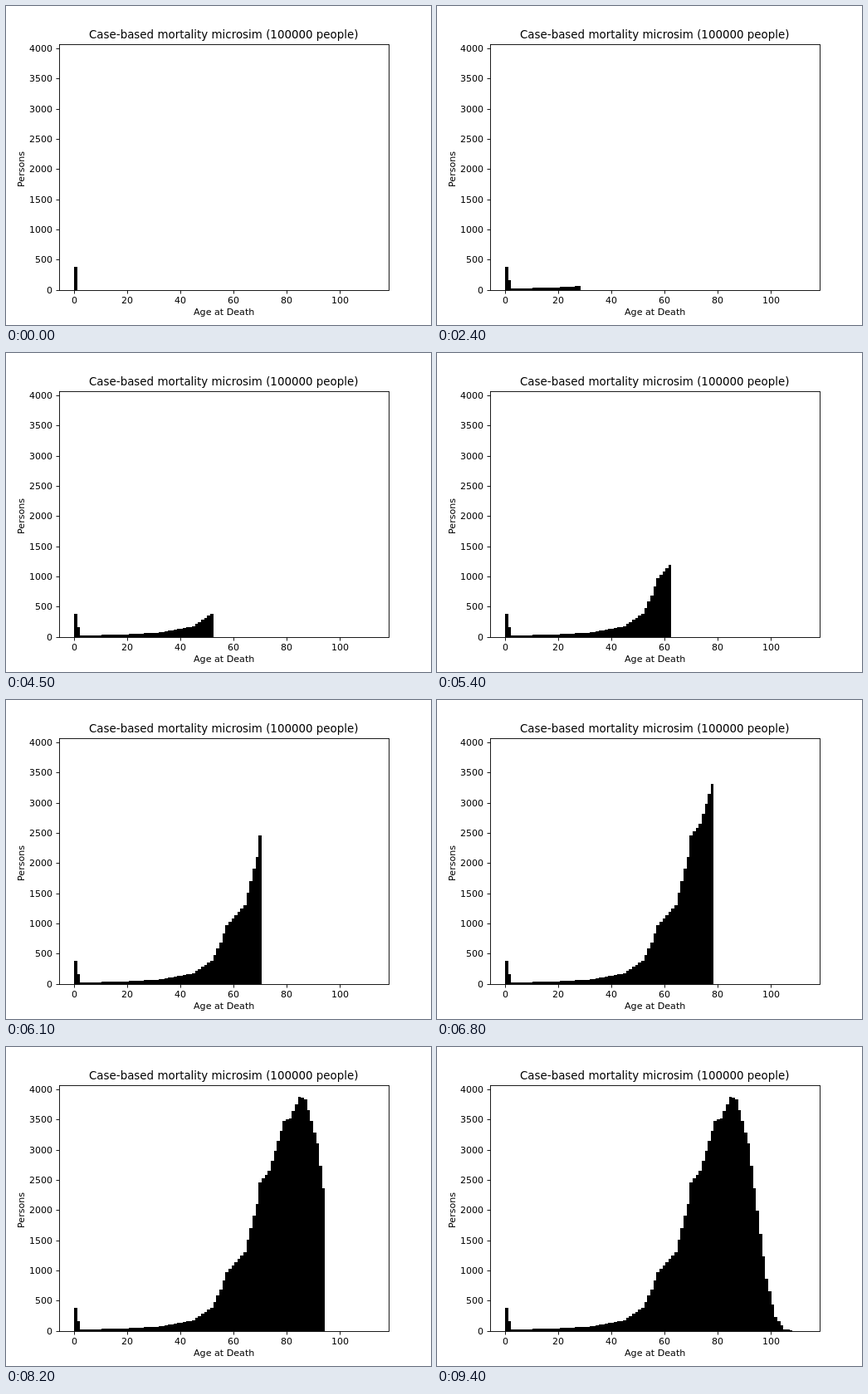
Write an HTML page with a canvas that moves like this. It is 512 px wide and 384 px high and loops after 9900 ms.

```html
<!DOCTYPE html>
<html lang="en">
<head>
<meta charset="utf-8">
<title>Age at Death</title>
<style>
  html, body { margin: 0; width: 100%; height: 100%; overflow: hidden; background: #fff; }
  canvas { display: block; }
</style>
</head>
<body>
<canvas id="chart" width="512" height="384"></canvas>
<script>
const ctx = document.getElementById('chart').getContext('2d');

const STEP = 100, LOOP = 9900, BAR_COUNT = 95;
const LEFT = 64, RIGHT = 461, TOP = 46, BOTTOM = 342;
const X0 = 82.04, BIN = 3.6437, X_UNIT = 3.2;
const Y0 = 341.76, Y_UNIT = 0.07265;
const TICK = 4;

// Bends of the mortality curve: [bin, height in pixels]
const curve = [
  [0, 28], [1, 12], [2, 2], [15, 3], [28, 5.5], [39, 13], [45, 28], [48, 50],
  [50, 71], [56, 95], [60, 153], [61, 179], [64, 193], [69, 253], [71, 256],
  [74, 282], [76, 279], [80, 226], [86, 63], [89, 17], [92, 2], [94, 1]
];

function barHeight(bin) {
  const next = Math.max(1, curve.findIndex(([b]) => b >= bin));
  const [b0, h0] = curve[next - 1];
  const [b1, h1] = curve[next];
  return Math.round(h0 + (h1 - h0) * (bin - b0) / (b1 - b0));
}

const barX = bin => Math.round(X0 + BIN * bin);

function line(x1, y1, x2, y2) {
  ctx.beginPath();
  ctx.moveTo(x1, y1);
  ctx.lineTo(x2, y2);
  ctx.stroke();
}

// anchor: 0.5 centres the text on x, 1 ends it there; starts on a whole pixel
function label(text, x, y, size, anchor = 0.5) {
  ctx.font = `${size}px "DejaVu Sans", sans-serif`;
  ctx.fillText(text, Math.round(x - ctx.measureText(text).width * anchor), y);
}

function drawAxes() {
  ctx.lineWidth = 0.889;
  ctx.strokeRect(LEFT + 0.5, TOP + 0.5, RIGHT - LEFT, BOTTOM - TOP);

  for (let age = 0; age <= 100; age += 20) {
    const x = X0 + age * X_UNIT, tickX = Math.round(x) + 0.5;
    line(tickX, BOTTOM + 0.5, tickX, BOTTOM + 0.5 + TICK);
    label(age, x, 358, 11);
  }
  for (let count = 0; count <= 4000; count += 500) {
    const y = Math.round(Y0 - count * Y_UNIT);
    line(LEFT + 0.5, y + 0.5, LEFT + 0.5 - TICK, y + 0.5);
    label(count, 56.2, y + 4, 11, 1);
  }

  label('Case-based mortality microsim (100000 people)', 262.4, 39, 13.42);
  label('Age at Death', 262.4, 372, 11.11);
  ctx.save();
  ctx.translate(22, 196);
  ctx.rotate(-Math.PI / 2);
  label('Persons', 0, 0, 11.11);
  ctx.restore();
}

function draw(time) {
  const shown = Math.min(BAR_COUNT, Math.floor((time % LOOP) / STEP) + 1);
  ctx.fillStyle = '#fff';
  ctx.fillRect(0, 0, 512, 384);
  ctx.fillStyle = ctx.strokeStyle = '#000';
  for (let bin = 0; bin < shown; bin++) {
    const x = barX(bin), height = barHeight(bin);
    ctx.fillRect(x, BOTTOM - height, barX(bin + 1) - x, height);
  }
  drawAxes();
}

const start = performance.now();
function tick() {
  draw(performance.now() - start);
  requestAnimationFrame(tick);
}
tick();
</script>
</body>
</html>
```
